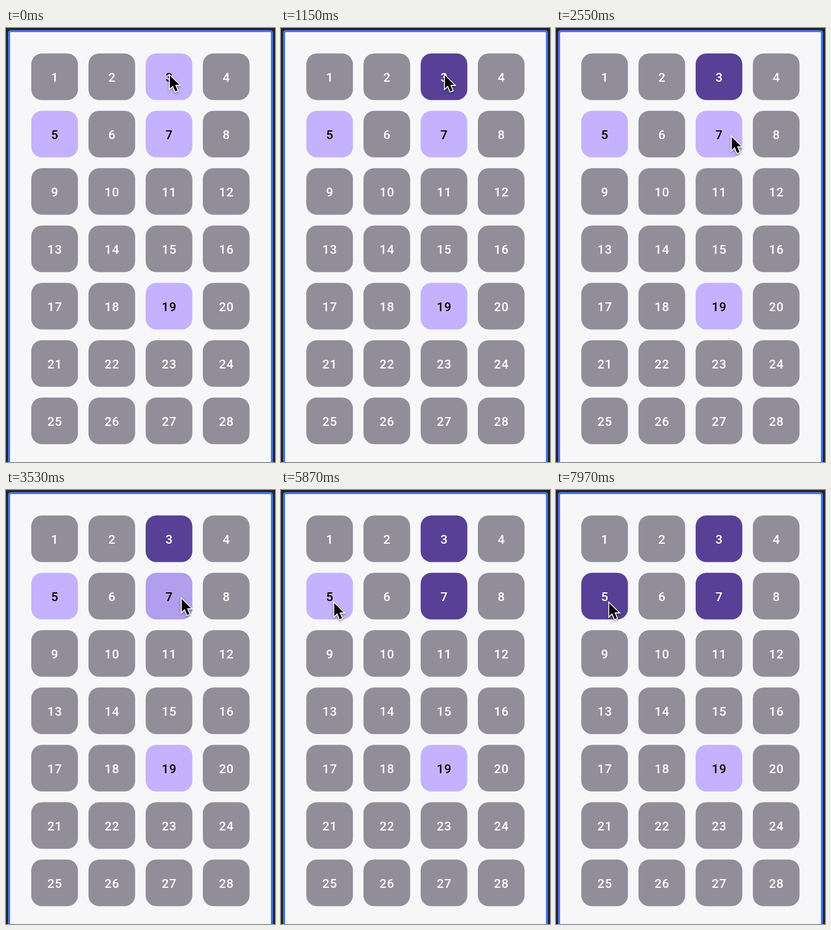
An HTML page with a canvas for the animation above (7.99 s loop, 522x840 px).

```html
<!DOCTYPE html>
<html lang="en">
<head>
<meta charset="utf-8">
<title>Number grid</title>
<style>
  html, body { margin: 0; width: 100%; height: 100%; overflow: hidden; background: #232326; }
  canvas { display: block; }
</style>
</head>
<body>
<canvas id="stage" width="522" height="840"></canvas>
<script>
const ctx = document.getElementById('stage').getContext('2d');
const LOOP = 7990;
const FADE = 300;
const BASE = [146, 142, 153];
const LILAC = [197, 178, 255];
const DARK = [87, 64, 150];

// Marked cells and the time each one is pressed
const marked = { 3: 650, 7: 3450, 5: 6300, 19: Infinity };

// Pointer moves: start, end, from, control, to
const moves = [
  [1500, 2200, [318, 92], [322, 170], [341, 211]],
  [4350, 5150, [341, 211], [189, 255], [103.3, 219]]
];

const clamp = v => Math.max(0, Math.min(1, v));
const ease = v => v * v * (3 - 2 * v);
const rgb = c => `rgb(${c.map(Math.round).join(',')})`;
const mix = (a, b, k) => a.map((v, i) => v + (b[i] - v) * k);

function box(x, y, w, h, r) {
  ctx.beginPath();
  ctx.roundRect(x, y, w, h, r);
}

function drawFrame() {
  ctx.fillStyle = '#232326';
  ctx.fillRect(0, 0, 522, 840);
  ctx.fillStyle = '#4576e6';
  box(4, 4, 514, 860, 5);
  ctx.fill();
  ctx.fillStyle = '#f7f7fa';
  box(8, 8, 506, 860, 2);
  ctx.fill();
}

function drawCell(n, t) {
  const x = 49 + (n - 1) % 4 * 111;
  const y = 49.2 + Math.floor((n - 1) / 4) * 111;
  let fill = BASE, ink = '#fff';
  if (n in marked) {
    const k = ease(clamp((t - marked[n]) / FADE));
    fill = mix(LILAC, DARK, k);
    if (k < 0.5) ink = '#000';
  }
  ctx.fillStyle = rgb(fill);
  box(x, y, 90.6, 90.4, 21);
  ctx.fill();
  ctx.fillStyle = ink;
  ctx.fillText(n, x + 45.7, y + 54.8);
}

function pointerAt(t) {
  let pos = moves[0][2];
  for (const [start, end, a, b, c] of moves) {
    if (t < start) break;
    const k = ease(clamp((t - start) / (end - start))), j = 1 - k;
    pos = a.map((v, i) => j * j * v + 2 * j * k * b[i] + k * k * c[i]);
  }
  return pos;
}

const arrow = new Path2D('M0 0V25L5.8 19.6L10.5 31L15 29.1L10.3 18.1H18.2Z');

function drawPointer(t) {
  ctx.save();
  ctx.translate(...pointerAt(t));
  ctx.lineWidth = 3.6;
  ctx.lineJoin = 'miter';
  ctx.strokeStyle = '#fff';
  ctx.shadowColor = 'rgba(0,0,0,0.4)';
  ctx.shadowBlur = 4;
  ctx.shadowOffsetY = 2;
  ctx.stroke(arrow);
  ctx.shadowColor = 'transparent';
  ctx.fillStyle = '#000';
  ctx.fill(arrow);
  ctx.restore();
}

function draw(t) {
  drawFrame();
  ctx.font = '500 24px Roboto, sans-serif';
  ctx.letterSpacing = '0.7px';
  ctx.textAlign = 'center';
  for (let n = 1; n <= 28; n++) drawCell(n, t);
  drawPointer(t);
}

const begin = performance.now();
function tick() {
  draw((performance.now() - begin) % LOOP);
  requestAnimationFrame(tick);
}
tick();
</script>
</body>
</html>
```
